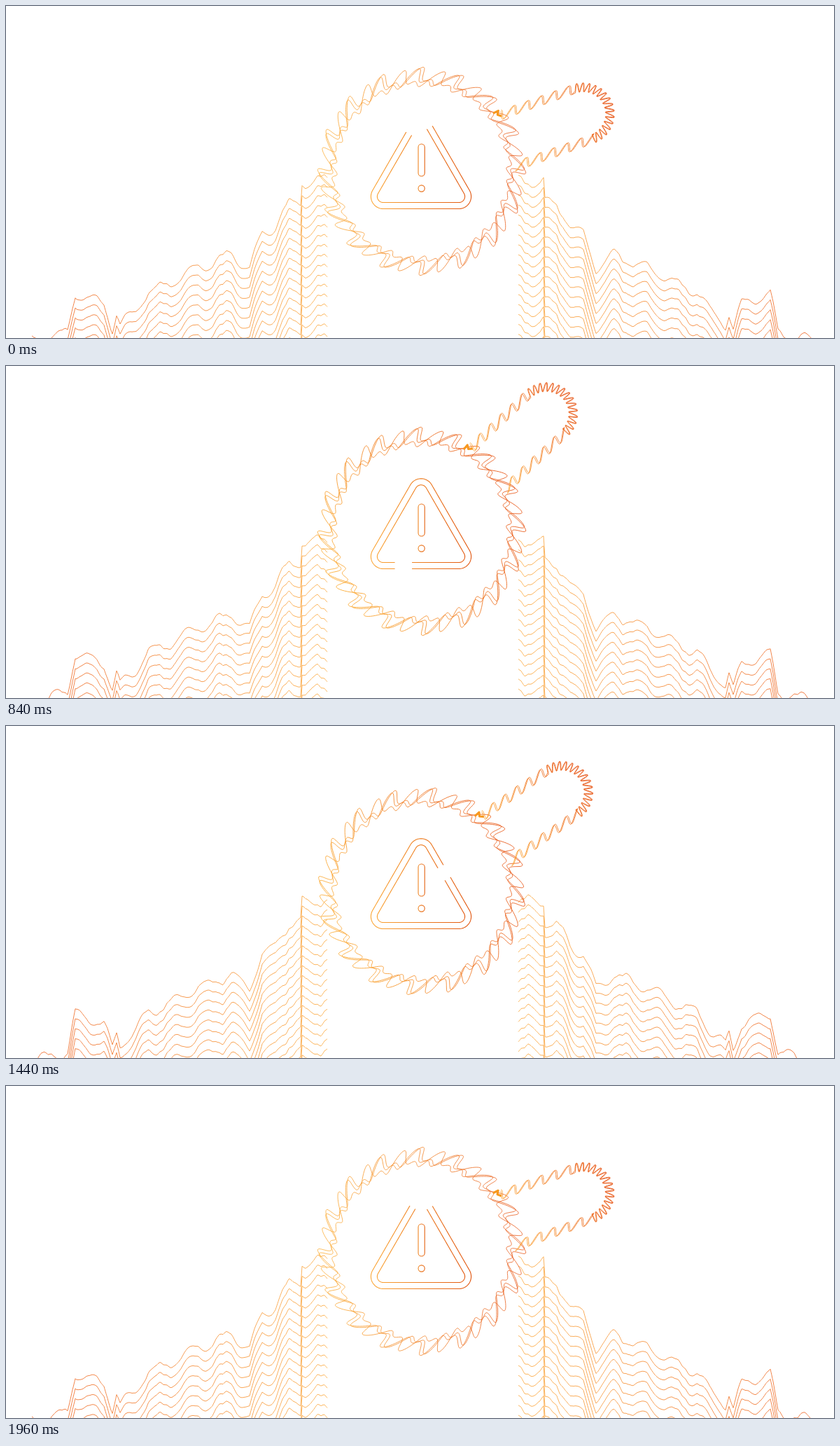
An HTML page with a canvas that plays this animation: 1183x474 px, repeating every 2 s.

```html
<!DOCTYPE html>
<html lang="en">
<head>
<meta charset="utf-8">
<title>Search alert</title>
<style>
  html, body { margin: 0; width: 100%; height: 100%; overflow: hidden; background: #fff; }
  canvas { display: block; width: 1183px; height: 474px; }
</style>
</head>
<body>
<canvas id="stage" width="1183" height="474"></canvas>
<script>
const ctx = document.getElementById('stage').getContext('2d');
const W = 1183, H = 474, LOOP = 2000, STEP = 40, TAU = Math.PI * 2, DEG = Math.PI / 180;

function gradient(x0, x1, from, to) {
  const g = ctx.createLinearGradient(x0, 0, x1, 0);
  g.addColorStop(0, from);
  g.addColorStop(1, to);
  return g;
}

// Strokes point(s) sampled from a to b.
function trace(a, b, step, point) {
  ctx.beginPath();
  const n = Math.ceil((b - a) / step);
  for (let i = 0; i <= n; i++) ctx.lineTo(...point(a + (b - a) * i / n));
  ctx.stroke();
}

// Same curve as CSS cubic-bezier(x1, 0, x2, 1).
function ease(x, x1, x2) {
  let lo = 0, hi = 1;
  for (let i = 0; i < 24; i++) {
    const p = (lo + hi) / 2, q = 1 - p;
    if (3 * q * q * p * x1 + 3 * q * p * p * x2 + p ** 3 < x) lo = p; else hi = p;
  }
  return lo * lo * (3 - 2 * lo);
}

// Key points of the left ridge; the right one mirrors it.
const RIDGE = [
  [36, 479], [66, 472], [88, 466], [99, 410], [140, 424], [152, 459], [158, 439], [163, 456],
  [186, 433], [203, 409], [237, 396], [270, 376], [322, 356], [348, 374], [366, 323],
  [380, 321], [404, 283], [421, 278], [423, 249], [428, 253], [459, 248]
];
const MIRROR = 1191, ROW_GAP = 14.2, NOTCH = 5;
const FAR = '#ec5b18', NEAR = '#fba636';

function ridge(x) {
  const i = Math.max(1, RIDGE.findIndex(([kx]) => kx >= x));
  const [x0, y0] = RIDGE[i - 1], [x1, y1] = RIDGE[i];
  return y0 + (y1 - y0) * (x - x0) / (x1 - x0);
}

function roughness(x) {
  const noise = i => (Math.abs(Math.sin(i * 12.9898) * 43758.5453) % 1 - 0.5) * 5;
  const cell = Math.floor(x / NOTCH), u = x / NOTCH - cell;
  return noise(cell) * (1 - u) + noise(cell + 1) * u;
}

function drawRidges(t) {
  const ripple = x => -7.5 * Math.cos(TAU * ((x - 127) / 46.2 - t / 1000));
  const side = (a, b, base, ink) => {
    ctx.strokeStyle = ink;
    for (let row = 0; row < 18; row++)
      trace(a, b, 1, x => [x, ridge(base(x)) + roughness(base(x)) + ripple(x) + row * ROW_GAP]);
  };
  side(37, 459, x => x, gradient(37, 459, FAR, NEAR));
  side(732, 1154, x => MIRROR - x, gradient(732, 1154, NEAR, FAR));
}

const TEETH = 16, CREST = -93 * DEG;

// Leaning teeth: the further out a point lies, the more it shifts along the ring.
function ringPoint(angle, phase, radius) {
  const u = TEETH * (angle - CREST) + phase;
  const out = 9 * Math.cos(u) + 6 * Math.cos(2 * u + 0.6);
  const a = angle + 0.0055 * out;
  return [(radius + out) * Math.cos(a), (radius + out) * Math.sin(a)];
}

// Handle in its own axes: out along the top, round the tip, back along the bottom.
const START = 131, TIP = 245, HALF = 38, RUN = TIP - START, ARC = Math.PI * HALF;
const RUN_TEETH = 5.5, TIP_TEETH = 15;

function handlePoint(s, phase) {
  const bend = Math.min(Math.max((s - RUN) / ARC, 0), 1);
  const before = Math.min(s, RUN), after = Math.max(s - RUN - ARC, 0);
  const a = (bend - 0.5) * Math.PI, nx = Math.cos(a), ny = Math.sin(a);
  const turns = RUN_TEETH * (before + after) / RUN + TIP_TEETH * bend;
  const out = 6.5 * Math.cos(TAU * turns + phase);
  const along = out * (bend > 0 && bend < 1 ? 0.2 : 0.8);
  return [
    START + before - after + nx * (HALF + out) - ny * along,
    ny * (HALF + out) + nx * along
  ];
}

function drawLens(t) {
  const swing = 25.6 * (1 - Math.cos(TAU * (t - 12) / LOOP)) / 2;
  ctx.save();
  ctx.translate(594, 236);
  ctx.rotate(-swing * DEG);

  ctx.strokeStyle = gradient(-146, 140, '#fcae36', '#e8591a');
  for (const [phase, radius] of [[0, 134], [0.6, 132], [2.9, 131]])
    trace(0, TAU, 0.008, a => ringPoint(a, phase, radius));

  ctx.rotate(-19.5 * DEG);
  ctx.strokeStyle = gradient(START, TIP + HALF, '#fba02c', '#e8591a');
  for (const phase of [0, 0.6])
    trace(0, 2 * RUN + ARC, 0.6, s => handlePoint(s, phase));

  ctx.strokeStyle = '#f7981f';
  ctx.lineWidth = 3;
  ctx.beginPath();
  for (const [x, y] of [[124, -44], [132, -45], [129, -40], [134, -36]]) ctx.lineTo(x, y);
  ctx.stroke();
  ctx.restore();
}

// Rounded warning triangle, walked from its apex down the left side.
const CORNERS = [[593, 178.3], [538.9, 272], [647.1, 272]];
const BEND = 27.2, EDGE = 108.2, ROUND = 3 * (BEND + EDGE);

function trianglePoint(s, offset) {
  const d = (s + BEND / 2 + ROUND) % ROUND;
  const k = Math.floor(d / (BEND + EDGE)) % 3, local = d - k * (BEND + EDGE);
  const turn = Math.min(local / BEND, 1), u = Math.max(local - BEND, 0) / EDGE;
  const a = -(30 + 120 * (k + turn)) * DEG;
  const [x0, y0] = CORNERS[k], [x1, y1] = CORNERS[(k + 1) % 3];
  return [x0 + (x1 - x0) * u + offset * Math.cos(a), y0 + (y1 - y0) * u + offset * Math.sin(a)];
}

function drawWarning(t) {
  // The two ends of the travelling gap ease separately.
  const lead = 25.7 + 396 * ease(t / LOOP, 0.33, 0.6);
  const trail = -15.6 + ROUND * ease(t / LOOP, 0.35, 0.52);
  ctx.lineWidth = 1.1;
  ctx.strokeStyle = gradient(522, 665, '#fba634', '#e0520a');
  for (const offset of [17.5, 8.5])
    trace(lead, trail + ROUND, 1, s => trianglePoint(s, offset));

  ctx.strokeStyle = gradient(588, 599, '#f08a28', '#e4600f');
  ctx.beginPath();
  ctx.roundRect(589, 197, 9.2, 46, 4.6);
  ctx.moveTo(598.2, 260.5);
  ctx.arc(593.6, 260.5, 4.6, 0, TAU);
  ctx.stroke();
}

function draw(now) {
  const t = Math.floor(now % LOOP / STEP) * STEP;
  ctx.clearRect(0, 0, W, H);
  ctx.lineWidth = 0.8;
  ctx.lineJoin = 'round';
  drawRidges(t);
  drawLens(t);
  drawWarning(t);
  requestAnimationFrame(draw);
}

draw(0);
</script>
</body>
</html>
```
